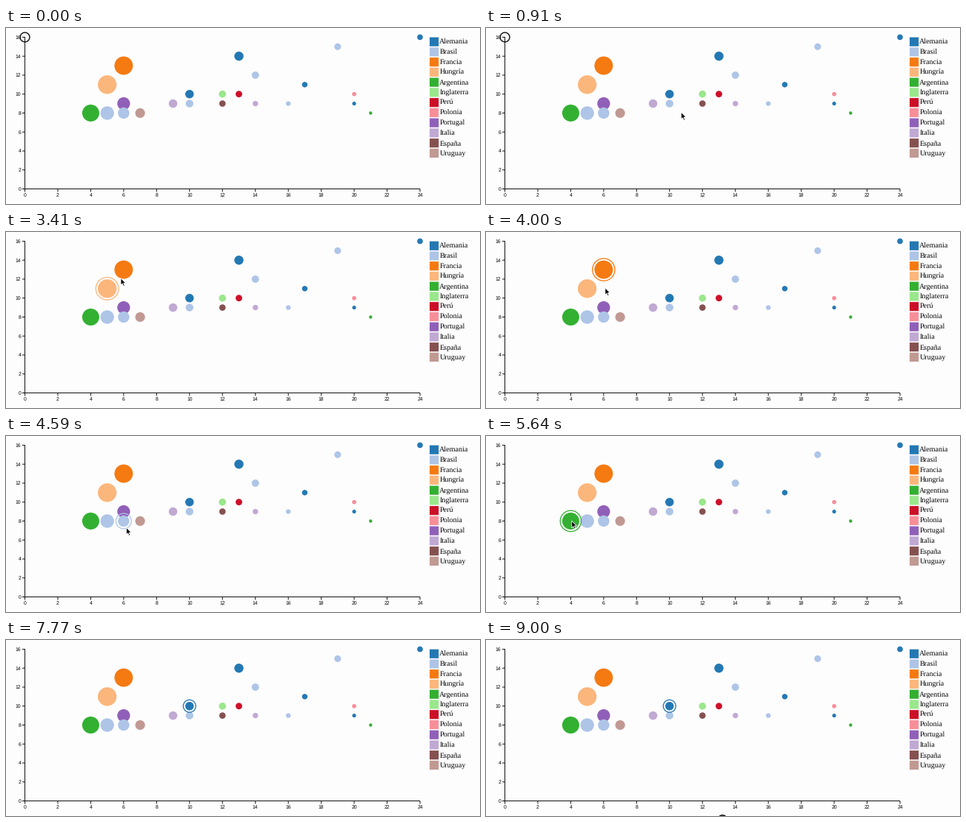
A matplotlib script that plays this animation: 640x239 px, repeating every 9.05 s.

```python
import numpy as np
import matplotlib.pyplot as plt
from matplotlib.animation import FuncAnimation
from matplotlib.patches import Circle, Polygon, Rectangle

W, H, DPI = 640, 239, 64
PT = 72 / DPI  # points per pixel
STEP, FRAMES = 50, 181
LEFT, RIGHT, TOP, BASE = 25.5, 559, 12.5, 218.5
BADGE_START = 8400

# country: colour and its (x, y) values, in legend order
TEAMS = {
    "Alemania": ("#2378b3", [(10, 10), (13, 14), (17, 11), (20, 9), (24, 16)]),
    "Brasil": ("#aec5e7", [(5, 8), (6, 8), (10, 9), (14, 12), (16, 9),
                           (19, 15)]),
    "Francia": ("#f57a12", [(6, 13)]),
    "Hungría": ("#fbb67c", [(5, 11)]),
    "Argentina": ("#33b032", [(4, 8), (21, 8)]),
    "Inglaterra": ("#9ae78c", [(12, 10)]),
    "Perú": ("#cc1029", [(13, 10)]),
    "Polonia": ("#f78f99", [(20, 10)]),
    "Portugal": ("#9060b8", [(6, 9)]),
    "Italia": ("#c0a9d3", [(9, 9), (14, 9)]),
    "España": ("#855150", [(12, 9)]),
    "Uruguay": ("#c19993", [(7, 8)]),
}

# pointer stops: time in ms, x, y
STOPS = np.array([
    (700, 330, 219), (900, 263.5, 115), (1850, 228, 100), (2250, 228, 100),
    (3100, 137, 80), (3400, 155, 63.3), (3650, 160, 52), (4550, 162.5, 125),
    (5550, 115, 116), (6700, 250.5, 92), (7450, 318, 240),
])
ARROW = np.array([(0, 0), (0, 9.4), (2.1, 7.4), (3.7, 11), (5.2, 10.3),
                  (3.7, 6.8), (6.6, 6.6)]) - (0, 0.6)

plt.rcParams["text.hinting"] = "none"


def sx(v):
    return LEFT + v * (RIGHT - LEFT) / 24


def sy(v):
    return BASE - v * (BASE - TOP) / 16


def make_dots():
    """Dots as (x, y, radius, colour), largest first; radius follows y / x."""
    dots = [(sx(x), sy(y), 5.75 * y / x, color)
            for color, points in TEAMS.values() for x, y in points]
    return sorted(dots, key=lambda d: -d[2])


def pointer(t):
    """Pointer position at time t, or None while it is off stage."""
    times = STOPS[:, 0]
    if not times[0] <= t < times[-1]:
        return None
    k = np.searchsorted(times, t, side="right") - 1
    u = (t - times[k]) / (times[k + 1] - times[k])
    u = u * u * (3 - 2 * u)
    return STOPS[k, 1:] + u * (STOPS[k + 1, 1:] - STOPS[k, 1:])


def focus_sequence(dots):
    """The dot touched last, for every frame."""
    focus, seq = None, []
    for i in range(FRAMES):
        pos = pointer(i * STEP)
        if pos is not None:
            for dot in dots:
                if np.hypot(pos[0] - dot[0], pos[1] - dot[1]) <= dot[2]:
                    focus = dot
        seq.append(focus)
    return seq


fig = plt.figure(figsize=(W / DPI, H / DPI), dpi=DPI, facecolor="#fefdfe")
ax = fig.add_axes([0, 0, 1, 1])
ax.set_xlim(0, W)
ax.set_ylim(H, 0)
ax.axis("off")


def line(xs, ys):
    ax.plot(xs, ys, color="#111111", lw=PT, solid_capstyle="butt",
            solid_joinstyle="miter", snap=False, zorder=1)


def label(x, y, text, size, family, ha="left"):
    ax.text(x, y, text, fontsize=size * PT, family=family, ha=ha,
            va="baseline", color="black", zorder=1)


def draw_axes():
    line([LEFT, LEFT], [TOP - 0.5, BASE + 0.5])
    line([LEFT, RIGHT], [BASE, BASE])
    for v in range(0, 25, 2):
        line([sx(v)] * 2, [BASE, BASE + 4])
        label(sx(v), 228.8, str(v), 6.8, "Liberation Sans", "center")
    for v in range(0, 17, 2):
        line([LEFT - 3.5, LEFT], [sy(v)] * 2)
        label(20.4, sy(v) + 2.4, str(v), 6.8, "Liberation Sans", "right")


def draw_legend():
    for k, (name, (color, _)) in enumerate(TEAMS.items()):
        y = 12.6 + 13.75 * k
        ax.add_patch(Rectangle((572, y), 12.2, 12.2, fc=color, ec="none",
                               snap=False))
        label(585.3, y + 9.3, name, 10.1, "Liberation Serif")


draw_axes()
draw_legend()
DOTS = make_dots()
FOCUS = focus_sequence(DOTS)
for x, y, r, color in DOTS:
    ax.add_patch(Circle((x, y), r, fc=color, ec="none", zorder=2))

ring = ax.add_patch(Circle((0, 0), 1, fill=False, zorder=3))
badge = ax.add_patch(Circle((319.3, 244.4), 6.5, fill=False, ec="black",
                            lw=1.5 * PT, zorder=3))
arrow = ax.add_patch(Polygon(ARROW, fc="black", ec="white", lw=0.8 * PT,
                             joinstyle="round", zorder=5))


def update(i):
    x, y, r, color = FOCUS[i] or (sx(0), sy(16), 3.7, "black")
    ring.set_center((x, y))
    ring.set_radius(r + 2.7)
    ring.set_edgecolor(color)
    ring.set_linewidth(1.3 * PT)

    pos = pointer(i * STEP)
    arrow.set_visible(pos is not None)
    if pos is not None:
        arrow.set_xy(ARROW + pos)
    badge.set_visible(i * STEP >= BADGE_START)
    return ring, arrow, badge


anim = FuncAnimation(fig, update, frames=FRAMES, interval=STEP,
                     init_func=lambda: update(0), repeat=True,
                     repeat_delay=0, blit=False)
plt.show()
```
